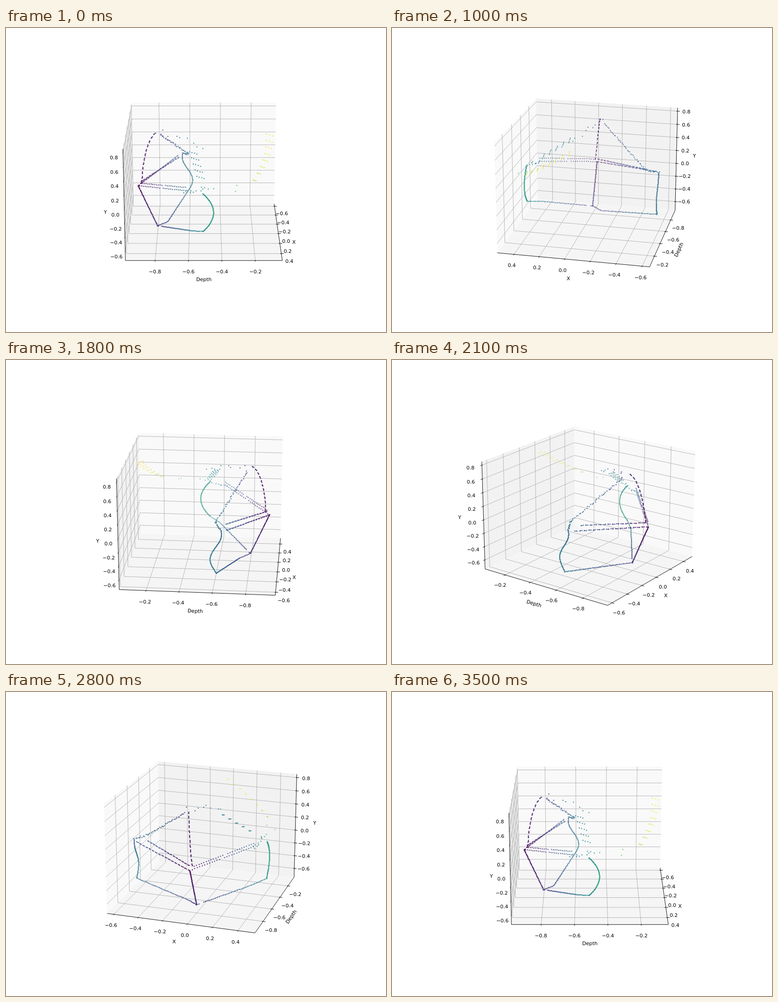
Animation of 837x669 px, one loop 3600 ms. Source, as an HTML page:

```html
<!DOCTYPE html>
<html lang="en">
<head>
<meta charset="utf-8">
<title>Rotating depth scan</title>
<style>
  html, body { margin: 0; width: 100%; height: 100%; overflow: hidden; background: #fff; }
  svg { display: block; width: 837px; height: 669px; }
  text { font: 11.11px "DejaVu Sans", sans-serif; text-anchor: middle; fill: #000; }
  .grid { fill: none; stroke: #b0b0b0; stroke-width: 0.95; }
  .axis { fill: none; stroke: #000; stroke-width: 0.95; }
</style>
</head>
<body>
<svg id="plot" viewBox="0 0 837 669"></svg>
<script>
const plot = document.getElementById('plot');
const STEP_MS = 100, STEPS = 36;
const CENTER_X = 435.9, CENTER_Y = 330.9, SCALE = 2784.5, CAMERA = 10;
const ELEV = 20 * Math.PI / 180, COS_E = Math.cos(ELEV), SIN_E = Math.sin(ELEV);

// Half sizes of the box and of the data, and the offsets used around the edges.
const W = 0.5952, H = 0.4464, DATA = 0.5195;
const TICK_OUT = 0.019, TICK_IN = 0.0095;
const TICK_PAD = [0.0627, 0.047], LABEL_PAD = [0.131, 0.098];

function ticks(first, last, mid, unit) {
  const list = [];
  for (let k = first; k <= last; k += 2) {
    list.push({ at: (k / 10 - mid) * unit, text: (k < 0 ? '\u2212' : '') + (Math.abs(k) / 10).toFixed(1) });
  }
  return list;
}
const X_TICKS = ticks(-6, 4, -0.062, 1.001);
const DEPTH_TICKS = ticks(-8, -2, -0.5077, 1.266);
const Y_TICKS = ticks(-6, 8, 0.0564, 0.5621);

// ---- point cloud: a scanned room ----
let seed = 7;
const random = () => (seed = seed * 16807 % 2147483647) / 2147483647;
const jitter = size => (random() - 0.5) * 2 * size;
const mix = (a, b, f) => a.map((c, i) => c + (b[i] - c) * f);
const cloud = [];

// Spaces points evenly along a polyline.
function trace(count, path, { keep = () => true, spread = 0 } = {}) {
  const lengths = path.slice(1).map((p, i) => Math.hypot(...p.map((c, k) => c - path[i][k])));
  const total = lengths.reduce((a, b) => a + b);
  for (let i = 0; i < count; i++) {
    if (!keep(i)) continue;
    let rest = total * i / (count - 1), s = 0;
    while (s < lengths.length - 1 && rest > lengths[s]) rest -= lengths[s++];
    cloud.push(mix(path[s], path[s + 1], rest / lengths[s]).map(c => c + jitter(spread)));
  }
}
const curve = fn => Array.from({ length: 41 }, (_, i) => fn(i / 40));
const row = (x, y, z, half, count) =>
  trace(count, [[x, y - half, z + half / 3], [x, y + half, z - half / 3]]);

// The middle corner M and the corners on the left (L) and right (R).
const M_TOP = [0.057, -0.518, -0.041], M_LOW = [0.061, -0.369, -0.379];
const left = z => [-DATA, -0.137 - 0.043 * Math.cos(Math.PI * z / 0.205), z];
const right = z => [DATA, 0.073 - 3.4 * (z + 0.088) ** 2, z];
const L_TOP = left(0.029), L_LOW = left(-0.315), R_LOW = right(-0.24);
const L_BEND = [-0.42, -0.127, 0.062], R_END = [0.446, -0.137, 0.063];
const PEAK = [-0.005, -0.365, 0.379];

trace(80, [M_TOP, M_LOW]);
trace(84, curve(f => left(0.029 - 0.344 * f)));
trace(90, curve(f => right(0.065 - 0.305 * f)));
trace(62, [M_LOW, [0.439, -0.097, -0.267], R_LOW], { keep: i => i < 3 || i > 5 });
trace(66, [M_LOW, [-0.03, -0.291, -0.383], L_LOW]);

// dashed edge bending over to the peak
trace(84, curve(f => {
  const a = f * Math.PI / 2, p = 1 / 0.9;
  return [0.066 - 0.071 * f, PEAK[1] - 0.121 * Math.cos(a) ** p, PEAK[2] - 0.393 * (1 - Math.sin(a) ** p)];
}), { keep: i => i % 7 < 4 });

// paired middle edges
const dashed = { keep: i => i % 4 < 3 }, broken = { keep: i => i !== 13 };
trace(27, [M_TOP, R_END], broken);
trace(26, [[0.084, -0.495, -0.011], [R_END[0], R_END[1], 0.089]], broken);
trace(68, [M_TOP, [-0.495, -0.21, 0.024]], dashed);
trace(60, [[0.045, -0.495, -0.01], [-0.405, -0.2, 0.04]], dashed);

// edges falling from the peak to both sides
trace(38, [mix(PEAK, L_BEND, 0.1), L_BEND], { spread: 0.005 });
trace(16, [L_BEND, L_TOP], { spread: 0.007 });
trace(8, [[-0.02, -0.311, 0.385], [0.144, -0.01, 0.31]], { spread: 0.02 });
for (let i = 0; i < 5; i++) row(0.184 + 0.05 * i, -0.082 + 0.014 * i, 0.275 - 0.032 * i, 0.028, 4);
trace(12, [R_END, [0.49, 0.06, 0.1]], { spread: 0.018 });

// distant strip and two strays
for (let i = 0; i < 8; i++) {
  row(0.042 + 0.053 * i, 0.51 - 0.0026 * i * i, 0.373 - 0.034 * i, 0.024 - 0.002 * i, 3);
}
trace(2, [[0.444, 0.248, 0.106], [0.517, 0.237, 0.086]]);

// ---- colour ----
const RAMP = ['440154', '3e4989', '26828e', '35b779', 'b5de2b', 'fde725'];
const STOPS = [0, 2 / 9, 4 / 9, 6 / 9, 8 / 9, 1];
const channels = hex => [0, 2, 4].map(i => parseInt(hex.slice(i, i + 2), 16));
function rampColor(t) {
  const clamped = Math.min(Math.max(t, 0), 1);
  const i = Math.min(Math.floor(clamped * 4.5), 4);
  const f = (clamped - STOPS[i]) / (STOPS[i + 1] - STOPS[i]);
  return `rgb(${mix(channels(RAMP[i]), channels(RAMP[i + 1]), f).map(Math.round)})`;
}
const colors = cloud.map(p => rampColor((p[1] + DATA) / (2 * DATA)));

// ---- drawing ----
function draw(step) {
  const azim = 2 * Math.PI * step / (STEPS - 1), cos = Math.cos(azim), sin = Math.sin(azim);
  const project = ([x, y, z]) => {
    const toward = x * cos + y * sin;
    const dist = CAMERA - toward * COS_E - z * SIN_E;
    return [CENTER_X + SCALE * (y * cos - x * sin) / dist,
      CENTER_Y - SCALE * (z * COS_E - toward * SIN_E) / dist, dist];
  };
  const pts = list => list.map(p => project(p).slice(0, 2).map(c => c.toFixed(2)).join()).join(' ');
  const line = (cls, ...list) => `<polyline class="${cls}" points="${pts(list)}"/>`;
  const pane = (fill, ...list) => `<polygon fill="${fill}" points="${pts(list)}"/>`;
  const label = (text, p, dy, angle = 0) => {
    const [x, y] = project(p);
    return `<text transform="translate(${x.toFixed(2)} ${y.toFixed(2)}) rotate(${angle.toFixed(2)})" y="${dy}">${text}</text>`;
  };

  // Signs of the two far walls; the axes run along the opposite edges.
  const sx = cos > 0 ? -1 : 1, sy = sin > -1e-9 ? -1 : 1;
  const bx = sx * W, by = sy * W, fx = -bx, fy = -by;
  const panes = pane('#f9f9f9', [bx, -W, -H], [bx, W, -H], [bx, W, H], [bx, -W, H])
    + pane('#f2f2f2', [-W, by, -H], [W, by, -H], [W, by, H], [-W, by, H])
    + pane('#f5f5f5', [-W, -W, -H], [W, -W, -H], [W, W, -H], [-W, W, -H]);
  let grid = '', axes = '', texts = '';

  const xPad = ([w, h], x) => [x, fy - sy * w, -H - h];
  const depthPad = ([w, h], y) => [fx - sx * w, y, -H - h];
  const yPad = ([w], z) => [fx - sx * w, by + sy * w, z];
  const outX = fx - sx * TICK_OUT, inX = fx + sx * TICK_IN;

  for (const { at, text } of X_TICKS) {
    grid += line('grid', [at, fy, -H], [at, by, -H], [at, by, H]);
    axes += line('axis', [at, fy - sy * TICK_OUT, -H], [at, fy + sy * TICK_IN, -H]);
    texts += label(text, xPad(TICK_PAD, at), 8.5);
  }
  for (const { at, text } of DEPTH_TICKS) {
    grid += line('grid', [fx, at, -H], [bx, at, -H], [bx, at, H]);
    axes += line('axis', [outX, at, -H], [inX, at, -H]);
    texts += label(text, depthPad(TICK_PAD, at), 8.5);
  }
  for (const { at, text } of Y_TICKS) {
    grid += line('grid', [fx, by, at], [bx, by, at], [bx, fy, at]);
    axes += line('axis', [outX, by, at], [inX, by, at]);
    texts += label(text, yPad(TICK_PAD, at), 8.5);
  }
  axes += line('axis', [-W, fy, -H], [W, fy, -H])
    + line('axis', [fx, -W, -H], [fx, W, -H])
    + line('axis', [fx, by, -H], [fx, by, H]);

  const [x0, y0] = project([fx, -W, -H]), [x1, y1] = project([fx, W, -H]);
  const slope = Math.atan((y1 - y0) / (x1 - x0)) * 180 / Math.PI;
  texts += label('X', xPad(LABEL_PAD, 0), 4)
    + label('Depth', depthPad(LABEL_PAD, 0), 3, slope)
    + label('Y', yPad(LABEL_PAD, 0), 4);

  // Dots sit on whole pixels and fade with distance; fill and rim overlap.
  const dots = cloud.map((p, i) => ({ p: project(p), color: colors[i] })).sort((a, b) => b.p[2] - a.p[2]);
  const far = dots[0].p[2], near = dots[dots.length - 1].p[2];
  const snap = c => Math.floor(c) + 0.5;
  const dotMarkup = dots.map(({ p: [x, y, dist], color }) => {
    const clear = 0.7 * (dist - near) / (far - near);
    return `<circle cx="${snap(x)}" cy="${snap(y)}" r="1.15" fill="${color}" fill-opacity="${(1 - clear * clear).toFixed(3)}"/>`;
  }).join('');

  plot.innerHTML = panes + grid + axes + texts + dotMarkup;
}

let shown = -1;
const start = performance.now();
function tick() {
  const step = Math.floor(Math.max(0, performance.now() - start) / STEP_MS) % STEPS;
  if (step !== shown) draw(shown = step);
  requestAnimationFrame(tick);
}
tick();
</script>
</body>
</html>
```
